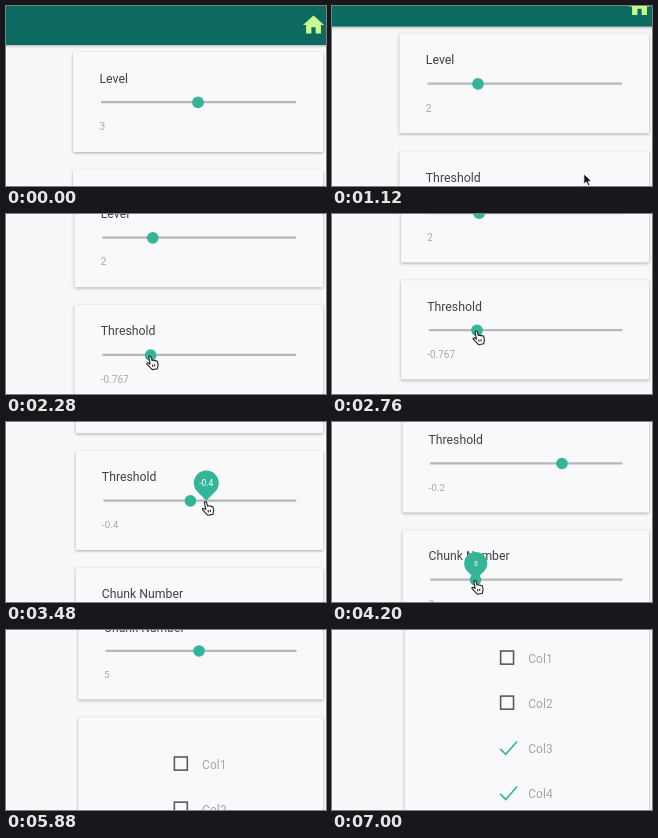
An HTML page for the animation above (7.04 s loop, 320 by 180 pixels).

```html
<!DOCTYPE html>
<html lang="en">
<head>
<meta charset="utf-8">
<title>Settings sliders</title>
<style>
  html, body { margin: 0; width: 100%; height: 100%; overflow: hidden; background: #f7f8fa; }
  svg { display: block; width: 320px; height: 180px; font-family: Roboto, "Noto Sans", sans-serif; }
  .bar { fill: #0d6a60; filter: drop-shadow(0 1.5px 1.5px rgba(0, 0, 0, .3)); }
  .home { fill: #c8fb8e; }
  .card { fill: #f9f9fb; filter: drop-shadow(0 1px 1.5px rgba(0, 0, 0, .32)); }
  .label { font-size: 12.4px; fill: #424244; }
  .value { font-size: 10.1px; fill: #a9a9ac; }
  .option { font-size: 12.3px; fill: #a6a6a9; }
  .track { stroke: #b8b8ba; stroke-width: 2.3; }
  .thumb, .pin path { fill: #34b597; }
  .pin text { font-size: 8.6px; fill: #fff; text-anchor: middle; }
  .box { fill: none; stroke: #58585b; stroke-width: 1.6; }
  .tick { fill: none; stroke: #34b597; stroke-width: 1.7; }
  .hand { fill: #fff; stroke: #222; stroke-width: 1.2; stroke-linejoin: round; }
  .arrow { fill: #111; stroke: #fff; stroke-width: .8; }
</style>
</head>
<body>
<svg viewBox="0 0 320 180">
  <g id="camera">
    <rect class="bar" x="-10" y="-20" width="350" height="59"/>
    <path class="home" transform="translate(294.8 6.3) scale(1.06)" d="M10 20v-6h4v6h5v-8h3L12 3 2 12h3v8z"/>
    <g id="page"></g>
    <g id="cursor">
      <path class="arrow" d="M0 0V10.5L2.5 8.3 4.2 12 6 11.2 4.4 7.7H7.8Z"/>
      <path class="hand" transform="translate(-.8 0) scale(.92)" d="M-1.2 1Q0-.6 1.2 1L2.4 5.2Q3.6 4.2 4.4 5.3 5.7 4.5 6.4 5.7 8 5.1 8.4 6.7L9 10.2 8.2 14.2 2.6 15.2-.8 11.6-3.4 8.9Q-3.2 7.2-1.5 7.9L.3 9ZM3 9.5V12M5.3 9.2V11.7"/>
    </g>
  </g>
</svg>
<script>
const LOOP = 7040, EASE = 1740, SPEED = 0.051;
const LAG = 70, ROW = 118;
const $ = id => document.getElementById(id);
const page = $("page"), cursor = $("cursor");
const [arrow, hand] = cursor.children;

function add(parent, tag, attrs, text) {
  const el = document.createElementNS("http://www.w3.org/2000/svg", tag);
  for (const key in attrs) el.setAttribute(key, attrs[key]);
  if (text) el.textContent = text;
  parent.appendChild(el);
  return el;
}

const clamp = v => Math.max(0, Math.min(1, v));
const mix = (a, b, f) => a + (b - a) * f;
const smooth = v => { v = clamp(v); return v * v * (3 - 2 * v); };
const sliderY = row => 97 + ROW * row;

// Vertical pan: accelerate, cruise, decelerate
function pan(t) {
  const total = SPEED * (LOOP - EASE);
  const ramp = d => SPEED * d * d / (2 * EASE);
  if (t < EASE) return ramp(t);
  if (t > LOOP - EASE) return total - ramp(LOOP - t);
  return SPEED * (t - EASE / 2);
}

const sliders = [
  { name: "Level", steps: 1, x: 192, v: 3, drags: [
    { start: 560, end: 760, x: 145.7, v: 2 }] },
  { name: "Threshold", steps: 30, x: 112, v: -0.9, drags: [
    { start: 1440, end: 1760, x: 150.8, v: -2 / 3 },
    { start: 1760, end: 2000, x: 143.6, v: -23 / 30 },
    { start: 3150, end: 3700, x: 228.7, v: -0.2 }] },
  { name: "Chunk Number", steps: 1, x: 141, v: 3, drags: [
    { start: 4160, end: 5260, x: 190.4, v: 5 }] }
];

function poseAt(s, t) {
  let { x, v } = s;
  for (const d of s.drags) {
    const f = smooth((t - d.start) / (d.end - d.start));
    x = mix(x, d.x, f);
    v = mix(v, d.v, f);
  }
  return { x, v };
}

// The pin grows just before a drag and shrinks just after it
const pinScale = (s, t) => Math.max(...s.drags.map(d =>
  Math.min(clamp((t - d.start + 70) / 120), clamp((d.end + 180 - t) / 120))));

// The cursor rides each drag and swings between rows in an arc to the right
const stops = [
  { start: 0, end: 0, at: () => ({ x: 200, y: 240 }) },
  ...sliders.flatMap((s, row) => s.drags.map(d => ({
    start: d.start - 70, end: d.end + 60,
    at: t => ({ x: poseAt(s, t).x, y: sliderY(row) })
  }))),
  { start: 5900, end: LOOP, at: () => ({ x: 345, y: 450 }) }
];

function cursorAt(t) {
  const i = stops.findIndex(s => t <= s.end);
  const next = stops[i];
  if (t >= next.start) return next.at(t);
  const prev = stops[i - 1];
  const a = prev.at(prev.end), b = next.at(next.start);
  const u = (t - prev.end) / (next.start - prev.end);
  const f = Math.sin(u * Math.PI / 2);
  const swing = 4.5 * u * (1 - u) * Math.abs(b.y - a.y);
  return { x: mix(a.x, b.x, f) + swing, y: mix(a.y, b.y, f) };
}

function card(row, height) {
  const g = add(page, "g", { transform: `translate(0 ${46 + ROW * row})` });
  add(g, "rect", { class: "card", x: 67, y: 0, width: 250, height, rx: 1 });
  return g;
}

sliders.forEach((s, row) => {
  const g = card(row, 100);
  add(g, "text", { class: "label", x: 93.4, y: 30.6 }, s.name);
  s.text = add(g, "text", { class: "value", x: 93.4, y: 78.2 });
  add(g, "path", { class: "track", d: "M95 50.2H290" });
  s.thumb = add(g, "circle", { class: "thumb", cy: 50.4, r: 5.9 });
  s.pin = add(g, "g", { class: "pin" });
  add(s.pin, "path", { d: "M0 0L-8.9-8.9A12.6 12.6 0 1 1 8.9-8.9Z" });
  s.pinText = add(s.pin, "text", { y: -14.7 });
});

const list = card(3, 300);
for (let i = 0; i < 4; i++) {
  const row = add(list, "g", { transform: `translate(164.4 ${48 + 46.1 * i})` });
  if (i < 2) add(row, "rect", { class: "box", x: .8, y: -7.3, width: 13.2, height: 13.4 });
  else add(row, "path", { class: "tick", d: "M.3.5 6 6.2 17.6-7" });
  add(row, "text", { class: "option", x: 29.1, y: 4.6 }, "Col" + (i + 1));
}

function draw(t) {
  const y = pan(t), scale = 1 - 8.3e-5 * y;
  $("camera").setAttribute("transform", `translate(${318 * (1 - scale)} ${-y}) scale(${scale})`);
  page.setAttribute("transform", `translate(0 ${-142.7 * smooth((t - 5500) / 900)})`);

  for (const s of sliders) {
    const { x, v } = poseAt(s, t);
    const shown = String(Number((Math.round(v * s.steps) / s.steps).toFixed(3)));
    s.text.textContent = s.pinText.textContent = shown;
    s.thumb.setAttribute("cx", poseAt(s, t - LAG).x);
    s.pin.setAttribute("transform", `translate(${x} 50.2) scale(${pinScale(s, t)})`);
  }

  const c = cursorAt(t);
  const pointing = sliders.some((s, row) => Math.abs(c.y - sliderY(row)) < 5);
  cursor.setAttribute("transform", `translate(${c.x} ${c.y})`);
  hand.style.display = pointing ? "" : "none";
  arrow.style.display = pointing ? "none" : "";
}

function tick() {
  draw(performance.now() % LOOP);
  requestAnimationFrame(tick);
}
tick();
</script>
</body>
</html>
```
